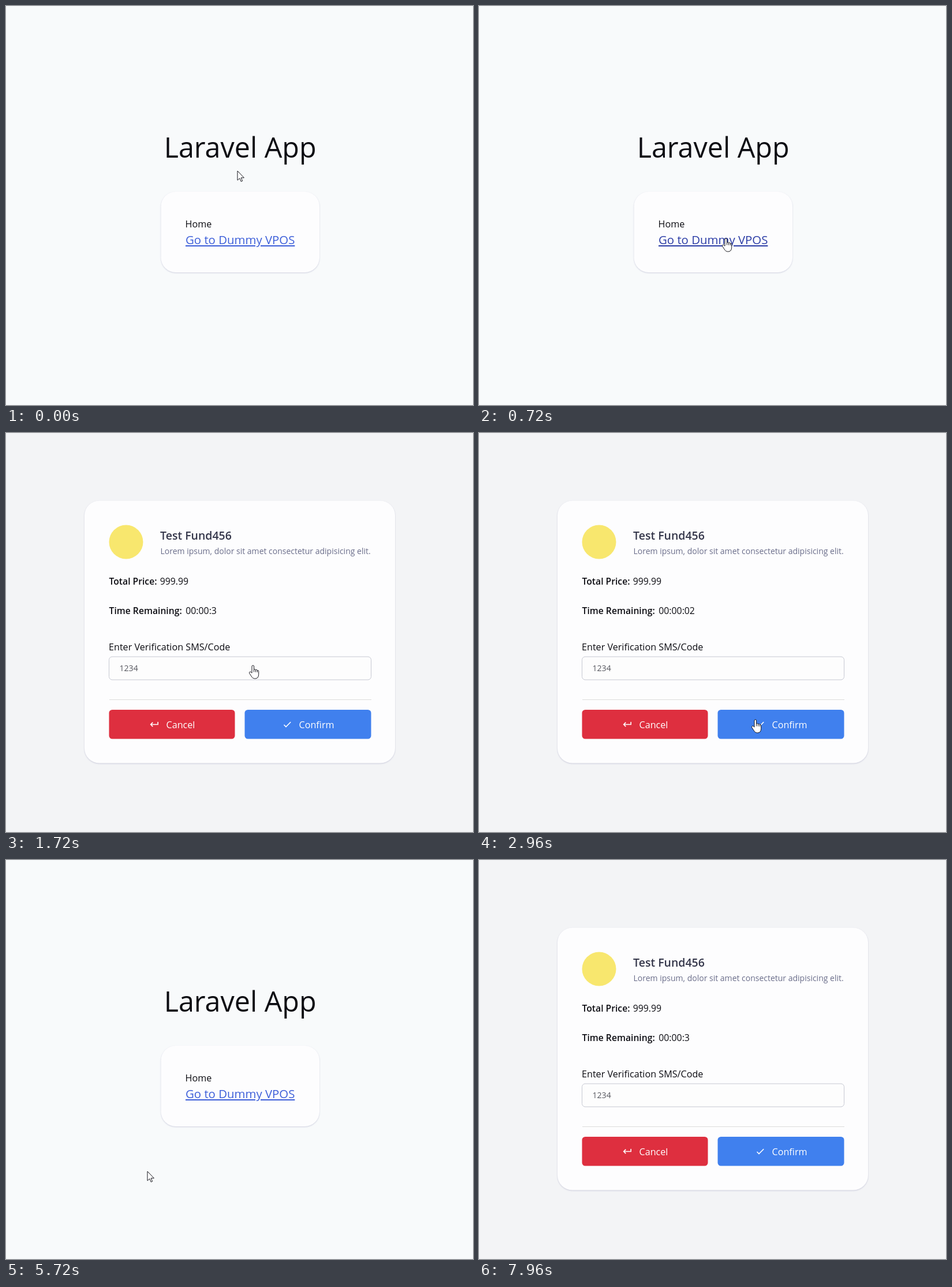
An HTML page for the animation above (8 s loop, 809 px wide and 692 px high).

```html
<!DOCTYPE html>
<html lang="en">
<head>
<meta charset="utf-8">
<title>Payment flow</title>
<style>
html, body { margin: 0; width: 100%; height: 100%; overflow: hidden; background: #f8fafb; }
svg { display: block; width: 100vw; height: 100vh; }
text { font: 16.15px "Open Sans", "Noto Sans", sans-serif; fill: #0c0c12; }
.title { font-size: 48.4px; text-anchor: middle; }
.strong { font-weight: 600; font-size: 15.7px; }
.value { font-size: 15.8px; }
.bank { font-weight: 600; font-size: 19.5px; fill: #34364a; }
.note { font-size: 14px; fill: #6a6d8a; }
.code { font-size: 14.1px; fill: #55565e; }
.white { fill: #fff; }
.ok { font-weight: 700; font-size: 19.8px; fill: #2bc95c; }
.mono text { font: 15.5px "Noto Sans Mono", "DejaVu Sans Mono", monospace; }
.link { fill: #3d5fd9; text-decoration: underline 1.5px; }
.big { font-size: 20.37px; }
.back { font-size: 16.05px; }
.card { fill: #fdfdfe; filter: drop-shadow(0 1px 1.3px rgba(40, 40, 110, .2)); }
.icon { fill: none; stroke: #fff; stroke-width: 1.6; }
.pointer path { fill: #fff; stroke: #15151c; stroke-width: 1; stroke-linejoin: round; }

/* One shared 8 s clock; hard changes use step-end */
.page, .flip { animation: 8s step-end infinite; }
.home { animation-name: home; }
.pay { animation-name: pay; }
.done { animation-name: done; }
.three { animation-name: three; }
.two { animation-name: two; }
.big { animation-name: bigHover; }
.back { animation-name: backHover; }
.arrow { animation-name: arrow; }
.hand { animation-name: hand; }
.beam { animation-name: beam; }
.pointer { animation: travel 8s ease-in-out infinite; }

@keyframes home { 0%, 67% { opacity: 1 } 21.5%, 92.5%, 100% { opacity: 0 } }
@keyframes pay { 0%, 43.5% { opacity: 0 } 21.5%, 92.5%, 100% { opacity: 1 } }
@keyframes done { 0%, 67%, 100% { opacity: 0 } 43.5% { opacity: 1 } }
@keyframes three { 0%, 60%, 100% { opacity: 1 } 34% { opacity: 0 } }
@keyframes two { 0%, 60%, 100% { opacity: 0 } 34% { opacity: 1 } }
@keyframes bigHover { 0%, 30%, 86%, 100% { fill: #3d5fd9 } 7.4%, 81% { fill: #2c3da6 } }
@keyframes backHover { 0%, 68%, 100% { fill: #3d66d9 } 62.7% { fill: #2c3da6 } }
@keyframes arrow {
  0%, 26%, 43.5%, 67%, 83.5%, 100% { opacity: 1 }
  7.4%, 30.5%, 62.7%, 81% { opacity: 0 }
}
@keyframes hand {
  0%, 22%, 43.5%, 67%, 83.5%, 100% { opacity: 0 }
  7.4%, 30.5%, 62.7%, 81% { opacity: 1 }
}
@keyframes beam { 0%, 26%, 100% { opacity: 0 } 22% { opacity: 1 } }
@keyframes travel {
  0%, .5% { transform: translate(401px, 286px) }
  8.5%, 22% { transform: translate(428px, 403px) }
  33%, 51.5% { transform: translate(479px, 497px) }
  57.5% { transform: translate(327.5px, 520px) }
  61.5% { transform: translate(329px, 522px) }
  65%, 74% { transform: translate(245px, 540px) }
  82% { transform: translate(400px, 408px) }
  83% { transform: translate(399px, 416px); animation-timing-function: linear }
  84.5% { transform: translate(397px, 443px) }
  95%, 100% { transform: translate(380px, 704px) }
}
</style>
</head>
<body>
<svg viewBox="0 0 809 692" preserveAspectRatio="none">
  <g class="page home">
    <rect width="809" height="692" fill="#f8fafb"/>
    <text class="title" x="405.7" y="263.3">Laravel App</text>
    <rect class="card" x="268.5" y="322" width="274.5" height="140" rx="25.6"/>
    <text x="310.5" y="384">Home</text>
    <text class="link big flip" x="311" y="413">Go to Dummy VPOS</text>
  </g>

  <g class="page pay">
    <rect width="809" height="692" fill="#f3f4f6"/>
    <rect class="card" x="136" y="117.5" width="538" height="455" rx="25.6"/>
    <circle cx="208" cy="189" r="29.5" fill="#f8e76e"/>
    <text class="bank" x="267" y="185">Test Fund456</text>
    <text class="note" x="267.5" y="210">Lorem ipsum, dolor sit amet consectetur adipisicing elit.</text>
    <text class="strong" x="178.5" y="263">Total Price:</text>
    <text class="value" x="266.7" y="263">999.99</text>
    <text class="strong" x="178.5" y="314">Time Remaining:</text>
    <text class="value flip three" x="311.3" y="314">00:00:3</text>
    <text class="value flip two" x="311.3" y="314">00:00:02</text>
    <text x="178" y="377">Enter Verification SMS/Code</text>
    <rect x="178.5" y="388" width="454" height="40" rx="5.5" fill="#fdfdfd" stroke="#c6c8d2"/>
    <text class="code" x="196.5" y="413">1234</text>
    <path d="M179 462.5H633" stroke="#dcdcdb"/>
    <rect x="178.5" y="480" width="218" height="50.5" rx="5.5" fill="#de2f3f"/>
    <rect x="413.5" y="480" width="219" height="50.5" rx="5.5" fill="#4080ee"/>
    <path class="icon" d="M263.2 501v4.5h-12.5m3.6-3.6-3.6 3.6 3.6 3.6M481.5 506l3.5 3.5 8.2-8.2"/>
    <text class="white" x="277.5" y="511.5">Cancel</text>
    <text class="white" x="507.5" y="511.5">Confirm</text>
  </g>

  <g class="page done">
    <rect width="809" height="692" fill="#f8fafb"/>
    <text class="title" x="405.7" y="123.3">Laravel App</text>
    <rect class="card" x="154" y="182" width="503" height="420" rx="25.6"/>
    <text class="ok" x="195.5" y="248">Succcess</text>
    <g class="mono">
      <text x="233" y="298.3">Array</text>
      <text x="196" y="323.7">(</text>
      <text x="233" y="349.1">[test] =&gt; 1</text>
      <text x="233" y="374.5">[tid] =&gt; e246462db1f6669d80e10a1d2ff042ac</text>
      <text x="233" y="399.9">[name] =&gt; Theo Lum</text>
      <text x="233" y="425.3">[price] =&gt; 999.99</text>
      <text x="233" y="450.7">[message] =&gt; Payment recieved.</text>
      <text x="233" y="476.1">[status] =&gt; 1</text>
      <text x="196" y="501.5">)</text>
    </g>
    <text class="link back flip" x="196" y="553">Return to Home</text>
  </g>

  <g class="pointer">
    <path class="flip arrow" d="M0 0V16.2L3.8 12.8 6.2 18.4 8.6 17.4 6.2 11.9H11.4Z"/>
    <g class="flip hand">
      <path d="M-2 2Q-2 0-.2 0T1.6 2V7.4Q3.2 6 4.6 7.7 6.4 6.8 7.4 8.6 9.6 8.1 9.7 10.5V15.5Q9.5 23 3.5 23-.8 23-3 18.8L-6.3 13.8Q-7.2 11.6-5.2 11-3.8 11-2 13.2Z"/>
      <path d="M1.6 7.4V11.5M4.6 7.7V11.8M7.4 8.6V12"/>
    </g>
    <path class="flip beam" d="M-3-8H3M0-8V8M-3 8H3"/>
  </g>
</svg>
</body>
</html>
```
